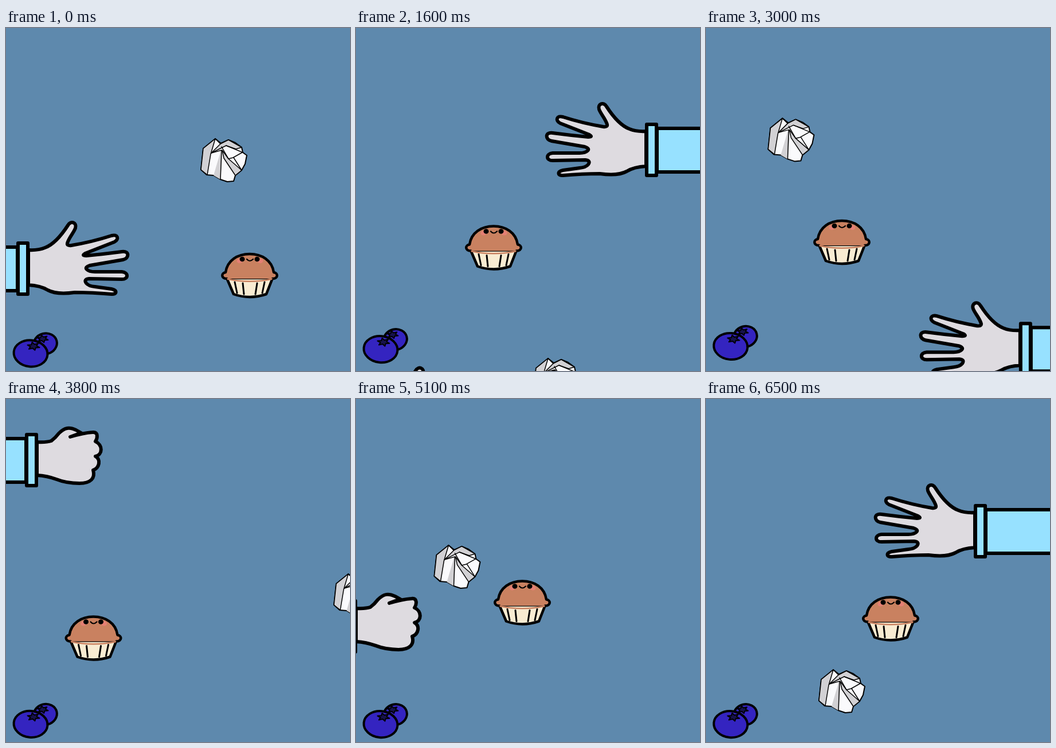
These frames come from a looping animation (600x598 px, 6.6 s). An HTML page with a canvas:

```html
<!DOCTYPE html>
<html>
<head>
<meta charset="utf-8">
<style>
html, body { margin: 0; height: 100%; overflow: hidden; background: #5e89ad; }
canvas { display: block; }
</style>
</head>
<body>
<canvas id="stage" width="600" height="598"></canvas>
<script>
const ctx = document.getElementById('stage').getContext('2d');
ctx.lineJoin = ctx.lineCap = 'round';
const LOOP = 6600, STEP = 100;

function shape(path, fill, width, line = '#000') {
  const p = new Path2D(path);
  if (fill) { ctx.fillStyle = fill; ctx.fill(p); }
  if (width) { ctx.lineWidth = width; ctx.strokeStyle = line; ctx.stroke(p); }
}

function oval(x, y, rx, ry, fill, width, turn = 0) {
  ctx.beginPath();
  ctx.ellipse(x, y, rx, ry, turn, 0, 7);
  ctx.fillStyle = fill;
  ctx.fill();
  if (width) { ctx.lineWidth = width; ctx.strokeStyle = '#000'; ctx.stroke(); }
}

function at(x, y, draw, flip = 1) {
  ctx.save();
  ctx.translate(x, y);
  ctx.scale(flip, 1);
  draw();
  ctx.restore();
}

const SKIN = '#dedbe0', SLEEVE = '#97e1ff';

function sleeve() {
  shape('M-500 382H20V458H-500Z', SLEEVE, 6);
  shape('M21 375H38V464H21Z', SLEEVE, 6);
}

function openHand() {
  shape(`M39 387Q56 388 68 383C84 377 97 361 108 344C113 335 124 339 121 349
    C118 357 110 365 107 375Q106 380 114 379Q150 373 184 362C195 359 198 368 189 373
    L138 393Q131 397 140 397Q172 394 202 390C216 388 215 402 204 404L146 414
    Q137 417 141 421Q145 425 155 425L202 425C214 426 214 438 202 438
    L145 437Q135 438 140 445Q144 450 155 451L184 455C195 457 193 465 184 464
    Q150 461 120 461C98 464 84 463 73 457Q60 449 39 448Z`, SKIN, 6);
  sleeve();
}

function fist() {
  at(-15, 313, () => shape(`M54 75Q70 76 79 73Q86 68 92 60C103 49 111 49 122 54L131 59
    L112 66Q135 59 151 58C161 57 160 68 156 74C169 80 169 97 156 100
    C166 106 163 120 152 124C156 138 148 147 128 147C108 147 98 144 88 140Q72 134 54 133Z`, SKIN, 6));
  shape('M97 379L116 372');
  sleeve();
}

function paper() {
  shape(`M344 210L365 193L375 201L388 195L400 200L411 208L413 217L420 222L417 237L411 248
    L400 257L397 267L386 268L374 264L362 257L350 256L340 247Z`, '#fafafc', 2);
  const GRAY = '#d2d1d4';
  shape('M344 210L365 193L357 220L351 256L340 247Z', GRAY, 1.5);
  shape('M375 213L377 226L374 264L362 257Z', GRAY);
  shape('M374 202L388 195L411 208L401 211L384 205L358 218Z', GRAY, 1.5);
  shape('M377 213L388 228L411 248L400 257L380 227Z', GRAY, 1.5);
  shape('M365 193L374 202M358 218L376 213L374 264M376 207L388 228L396 226L412 217M397 226L411 248M384 205L413 217', null, 1.5);
}

function muffin() {
  shape('M385 436L397 464Q425 474 454 464L465 436Z', '#f9ecd2', 4.5);
  shape(`M385 437C375 437 375 427 383 426C386 405 404 394 425 394S464 405 467 426
    C475 427 475 437 465 437`, '#c98160', 4.5);
  shape('M385 436Q425 445 465 436L464 439Q425 447 386 439Z', '#c98160');
  shape('M399 443L403 462M413 445L415 464M438 445L435 464M451 443L447 462', null, 3);
  for (const side of [-1, 1]) {
    oval(425.5 + side * 18, 406, 5, 4, '#e57f74');
    oval(425 + side * 13, 403, 4.5, 4.3, '#000');
  }
  shape('M420 403Q425 409 431 403', null, 2.2);
}

function crown(x, y, size) {
  ctx.beginPath();
  for (let i = 0; i < 12; i++) {
    const a = i * Math.PI / 6 + 0.3, r = size * (i % 2 ? 0.5 : 1);
    ctx.lineTo(x + r * Math.cos(a), y + r * 0.65 * Math.sin(a));
  }
  ctx.closePath();
  ctx.fillStyle = '#17124d';
  ctx.fill();
  ctx.lineWidth = 2;
  ctx.strokeStyle = '#000';
  ctx.stroke();
}

function berries() {
  oval(68.5, 550.5, 20.5, 18, '#3424c0', 4, -0.25);
  crown(64, 542, 10);
  oval(43, 567.5, 29.5, 23, '#3424c0', 4, 0.1);
  crown(48, 555, 11);
}

// time in seconds, then the offset of the muffin
const route = [[0, 0, 0], [.7, -140, -108], [1.6, -185, -48.5], [3, -188, -58],
  [3.8, -272.5, -14.5], [5.1, -135, -76.5], [6.5, -103, -48.5]];

function follow(t) {
  let i = 0;
  while (i < route.length - 2 && t >= route[i + 1][0]) i++;
  const a = route[i], b = route[i + 1], h = b[0] - a[0], u = (t - a[0]) / h;
  const slope = (j, k) => {
    const p = route[Math.max(j - 1, 0)], q = route[Math.min(j + 1, route.length - 1)];
    return (q[k] - p[k]) / (q[0] - p[0]) * h;
  };
  return [1, 2].map(k => {
    const d = b[k] - a[k], m = slope(i, k), n = slope(i + 1, k);
    return a[k] + m * u + (3 * d - 2 * m - n) * u * u + (m + n - 2 * d) * u ** 3;
  });
}

function frame(now) {
  const t = Math.floor(now % LOOP / STEP) * STEP / 1000;
  ctx.fillStyle = '#5e89ad';
  ctx.fillRect(0, 0, 600, 598);

  at(65.4 * t - 42.5 * t * t, 158.5 * t, openHand);
  let u = t - 3.8;
  at(15 - 41.5 * u, -313 + 223 * u, fist);
  u = t - 1.6;
  at(545 - 7.9 * u + 27 * u * u, -207 + 248 * u, openHand, -1);
  u = t - 6.5;
  at(508 - 6 * u + 27 * u * u, -189 + 242 * u, openHand, -1);

  // each paper ball flies straight: moment, offset, speed
  for (const [t0, x, y, vx, vy] of [[0, 0, 0, 50, -390], [1.6, -30, 383, -144, -299],
    [3.8, 232, 112, -335, -38.5], [6.5, -143, 279, 315, -100]])
    at(x + vx * (t - t0), y + vy * (t - t0), paper);

  at(...follow(t), muffin);
  at(0, -9 * (1 - Math.cos(2 * Math.PI * (t / 1.28 - .03))), berries);
  requestAnimationFrame(frame);
}
requestAnimationFrame(frame);
</script>
</body>
</html>
```
